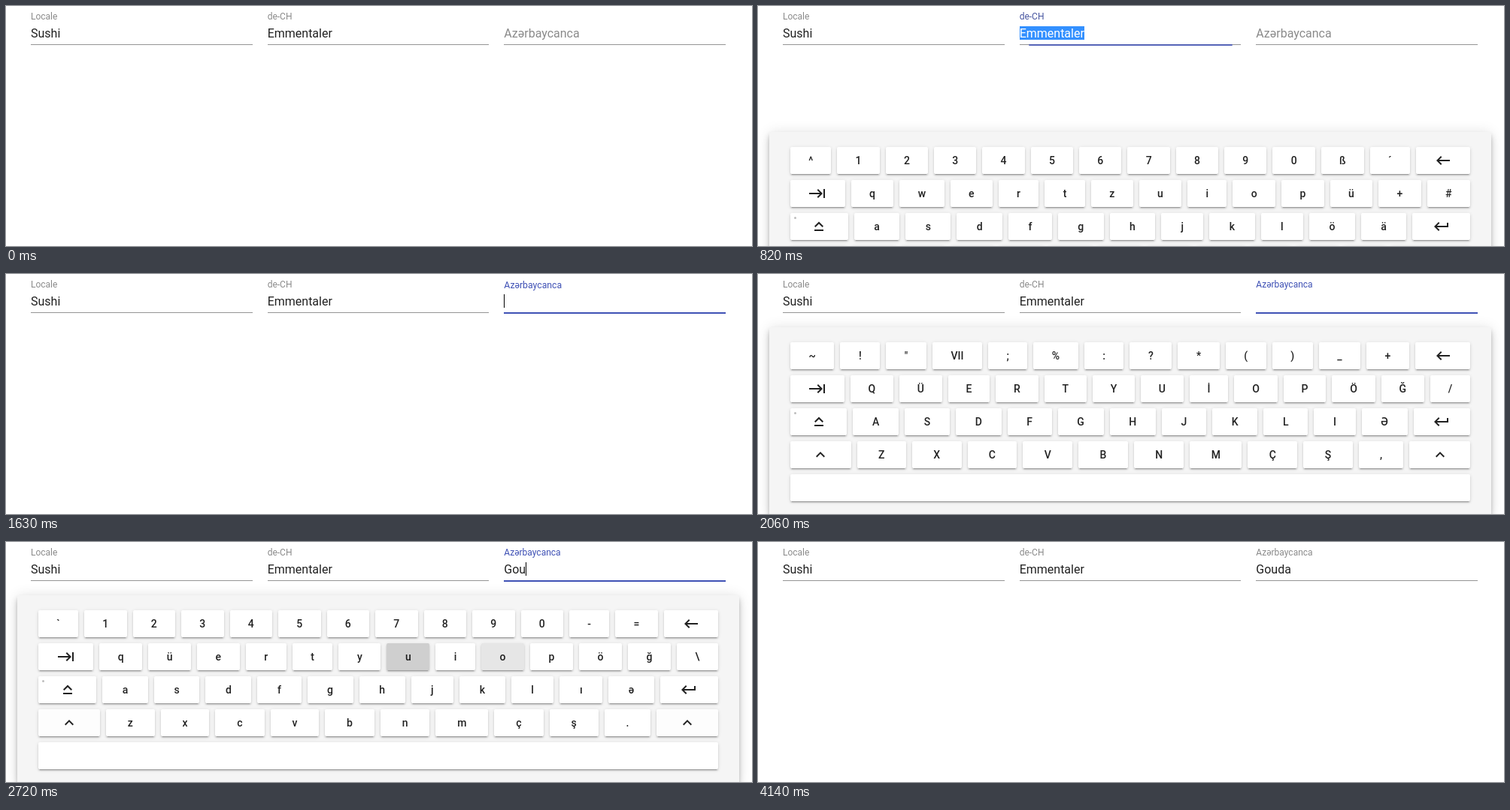
These frames come from a looping animation (992x320 px, 4200 ms). An HTML page:

```html
<!DOCTYPE html>
<html lang="en">
<head>
<meta charset="utf-8">
<title>On-screen keyboard</title>
<style>
  html, body { margin: 0; width: 100%; height: 100%; overflow: hidden; background: #fff; }
  #stage {
    position: relative; width: 992px; height: 320px; overflow: hidden; background: #fff;
    font-family: Roboto, sans-serif; color: rgba(0, 0, 0, .87);
  }
  .field { position: absolute; top: 0; width: 294.67px; height: 60px; }
  .field > * { position: absolute; left: 0; white-space: pre; }
  .label { top: 7px; font-size: 12px; line-height: 14px; }
  .value { top: 27px; height: 18px; font-size: 16px; line-height: 19px; }
  .value.selected { background: #3390ff; color: #fff; }
  .caret { position: absolute; left: 100%; top: 0; width: 1px; height: 18px; background: #000; }
  .line { top: 51px; width: 100%; height: 1px; background: rgba(0, 0, 0, .42); }
  .ripple { top: 51px; width: 100%; height: 2px; background: #3f51b5; }
  .sheet {
    position: absolute; left: 15px; width: 960px; padding: 16px 24px; box-sizing: border-box;
    background: #f5f5f5; border-radius: 2px;
    box-shadow: 0 3px 5px -1px rgba(0, 0, 0, .2), 0 6px 10px rgba(0, 0, 0, .14), 0 1px 18px rgba(0, 0, 0, .12);
  }
  .row { display: flex; }
  .key {
    position: relative; flex: 1 1 auto; height: 36px; margin: 4px; border-radius: 2px; background: #fff;
    font-size: 14px; font-weight: 500; line-height: 36px; text-align: center; white-space: pre;
    box-shadow: 0 3px 1px -2px rgba(0, 0, 0, .2), 0 2px 2px rgba(0, 0, 0, .14), 0 1px 5px rgba(0, 0, 0, .12);
  }
  .key svg { display: block; width: 24px; height: 24px; margin: 6px auto; }
  .dot { position: absolute; left: 5px; top: 5px; width: 3px; height: 3px; border-radius: 50%; background: #bdbdbd; }
</style>
</head>
<body>
<div id="stage"></div>
<script>
const LOOP = 4200;
const BOTTOM = 323;
const stage = document.getElementById('stage');

const icons = {
  back: 'M21 11H6.83l3.58-3.59L9 6l-6 6 6 6 1.41-1.41L6.83 13H21z',
  tab: 'M11.59 7.41L15.17 11H1v2h14.17l-3.59 3.59L13 18l6-6-6-6-1.41 1.41zM20 6v12h2V6h-2z',
  caps: 'M12 8.41L16.59 13 18 11.59l-6-6-6 6L7.41 13 12 8.41zM6 18h12v-2H6v2z',
  enter: 'M19 7v4H5.83l3.58-3.59L8 6l-6 6 6 6 1.41-1.41L5.83 13H21V7z',
  shift: 'M7.41 15.41L12 10.83l4.59 4.58L18 14l-6-6-6 6z'
};

const layouts = {
  german: [
    '^ 1 2 3 4 5 6 7 8 9 0 ß ´ back',
    'tab q w e r t z u i o p ü + #',
    'caps a s d f g h j k l ö ä enter',
    'shift < y x c v b n m , . - AltGraph',
    'space'
  ],
  digits: ['1 2 3'],
  lower: [
    '` 1 2 3 4 5 6 7 8 9 0 - = back',
    'tab q ü e r t y u i o p ö ğ \\',
    'caps a s d f g h j k l ı ə enter',
    'shift z x c v b n m ç ş . shift',
    'space'
  ],
  upper: [
    '~ ! " VII ; % : ? * ( ) _ + back',
    'tab Q Ü E R T Y U İ O P Ö Ğ /',
    'caps A S D F G H J K L I Ə enter',
    'shift Z X C V B N M Ç Ş , shift',
    'space'
  ]
};

// Key presses on the third field's keyboard: [down, up]
const presses = {
  shift: [2060, 2540], g: [2200, 2240], o: [2560, 2660],
  u: [2680, 2740], d: [2800, 2880], a: [2920, 2960]
};
const typed = [[2240, 'G'], [2600, 'Go'], [2720, 'Gou'], [2840, 'Goud'], [2960, 'Gouda']];

// Sheet visits: layout, enter start and end, exit start and end
const visits = [
  ['german', 0, 180, 720, 900],
  ['digits', 880, 1060, 1420, 1600],
  ['lower', 1690, 1870, 3800, 3995]
];

const clamp = v => Math.max(0, Math.min(1, v));
const between = (t, a, b) => t >= a && t < b;
const mix = (a, b, p) => a + (b - a) * p;

function bezier(x1, y1, x2, y2) {
  const at = (a, b, s) => 3 * a * s * (1 - s) ** 2 + 3 * b * s * s * (1 - s) + s ** 3;
  return p => {
    if (p <= 0 || p >= 1) return clamp(p);
    let lo = 0, hi = 1;
    for (let i = 0; i < 20; i++) {
      const mid = (lo + hi) / 2;
      if (at(x1, x2, mid) < p) lo = mid; else hi = mid;
    }
    return at(y1, y2, lo);
  };
}
const decelerate = bezier(0, 0, .2, 1);
const accelerate = bezier(.4, 0, 1, 1);
const swift = bezier(.25, .8, .25, 1);

function add(parent, className, text = '') {
  const el = document.createElement('div');
  el.className = className;
  el.textContent = text;
  parent.append(el);
  return el;
}

function makeField(i, label, value) {
  const box = add(stage, 'field');
  box.style.left = 33 + i * 314.67 + 'px';
  const field = { label: add(box, 'label', label), value: add(box, 'value') };
  field.text = document.createTextNode(value);
  field.value.append(field.text);
  field.caret = add(field.value, 'caret');
  add(box, 'line');
  field.ripple = add(box, 'ripple');
  return field;
}

function makeSheet(rows) {
  const el = add(stage, 'sheet');
  const height = rows.length * 44 + 32;
  el.style.height = height + 'px';
  const keys = [];
  for (const row of rows) {
    const line = add(el, 'row');
    for (const name of row.split(' ')) {
      const key = add(line, 'key');
      if (icons[name]) key.innerHTML = `<svg viewBox="0 0 24 24"><path d="${icons[name]}" fill="rgba(0,0,0,.87)"/></svg>`;
      else if (name !== 'space') key.textContent = name;
      if (name === 'caps') add(key, 'dot');
      keys.push({ name, el: key });
    }
  }
  return { el, height, keys };
}

const fields = [['Locale', 'Sushi'], ['de-CH', 'Emmentaler'], ['Azərbaycanca', '']]
  .map(([label, value], i) => makeField(i, label, value));
const sheets = {};
for (const name in layouts) sheets[name] = makeSheet(layouts[name]);

// The picture advances in 60 ms steps, counted from the start of each action
const actions = [0, 430, 760, 1450, 2060, 2600, 3390, 3830, 4140];
function step(t) {
  const start = actions.filter(a => a <= t).pop();
  return start + Math.floor((t - start) / 60) * 60;
}

function keyShade(name, t) {
  if (name === 'enter') return 17 * (1 - (1 - clamp((t - 3350) / 160)) ** 2);
  const press = presses[name];
  if (!press || t < press[0]) return 0;
  const [down, up] = press;
  return 48 * (t < up ? clamp((t - down) / 40) : (1 - clamp((t - up) / 220)) ** 2);
}

function drawFields(t) {
  const spans = [[60, 760], [760, 1450], [1450, 3830]];
  fields.forEach((field, i) => {
    const [from, to] = spans[i];
    const focus = between(t, from, to) ? clamp((t - from + 40) / 120) : 0;
    const blue = [63, 81, 181].map(c => Math.round(c * focus));
    field.label.style.color = `rgba(${blue}, ${mix(.46, 1, focus)})`;
    field.ripple.style.opacity = focus;
    field.ripple.style.transform = `scaleX(${mix(.5, 1, focus)})`;
  });

  fields[1].value.classList.toggle('selected', between(t, 760, 1450));

  const last = fields[2];
  const float = swift(clamp((t - 1430) / 400));
  last.label.style.top = mix(27, 7, float) + 'px';
  last.label.style.fontSize = mix(16, 12, float) + 'px';
  last.label.style.lineHeight = mix(19, 14, float) + 'px';
  const entry = typed.filter(e => e[0] <= t).pop();
  last.text.data = entry ? entry[1] : '';

  const carets = [between(t, 60, 430), false, between(t, 1510, 2060) || between(t, 2240, 3490)];
  fields.forEach((field, i) => field.caret.style.display = carets[i] ? '' : 'none');
}

function drawSheets(t) {
  const shown = {};
  for (const [name, in0, in1, out0, out1] of visits) {
    if (t <= in0 || t >= out1) continue;
    const open = t < out0
      ? decelerate(clamp((t - in0) / (in1 - in0)))
      : 1 - accelerate((t - out0) / (out1 - out0));
    shown[name === 'lower' && between(t, 2060, 2240) ? 'upper' : name] = open;
  }
  for (const name in sheets) {
    const { el, height, keys } = sheets[name];
    const open = shown[name];
    el.style.visibility = open ? 'visible' : 'hidden';
    if (!open) continue;
    el.style.top = Math.round(BOTTOM - height * open) + 'px';
    if (name !== 'lower' && name !== 'upper') continue;
    for (const key of keys) {
      const c = Math.round(255 - keyShade(key.name, t));
      key.el.style.background = `rgb(${c}, ${c}, ${c})`;
    }
  }
}

const begin = performance.now();
function frame() {
  const t = step((performance.now() - begin) % LOOP);
  drawFields(t);
  drawSheets(t);
  requestAnimationFrame(frame);
}
frame();
</script>
</body>
</html>
```
